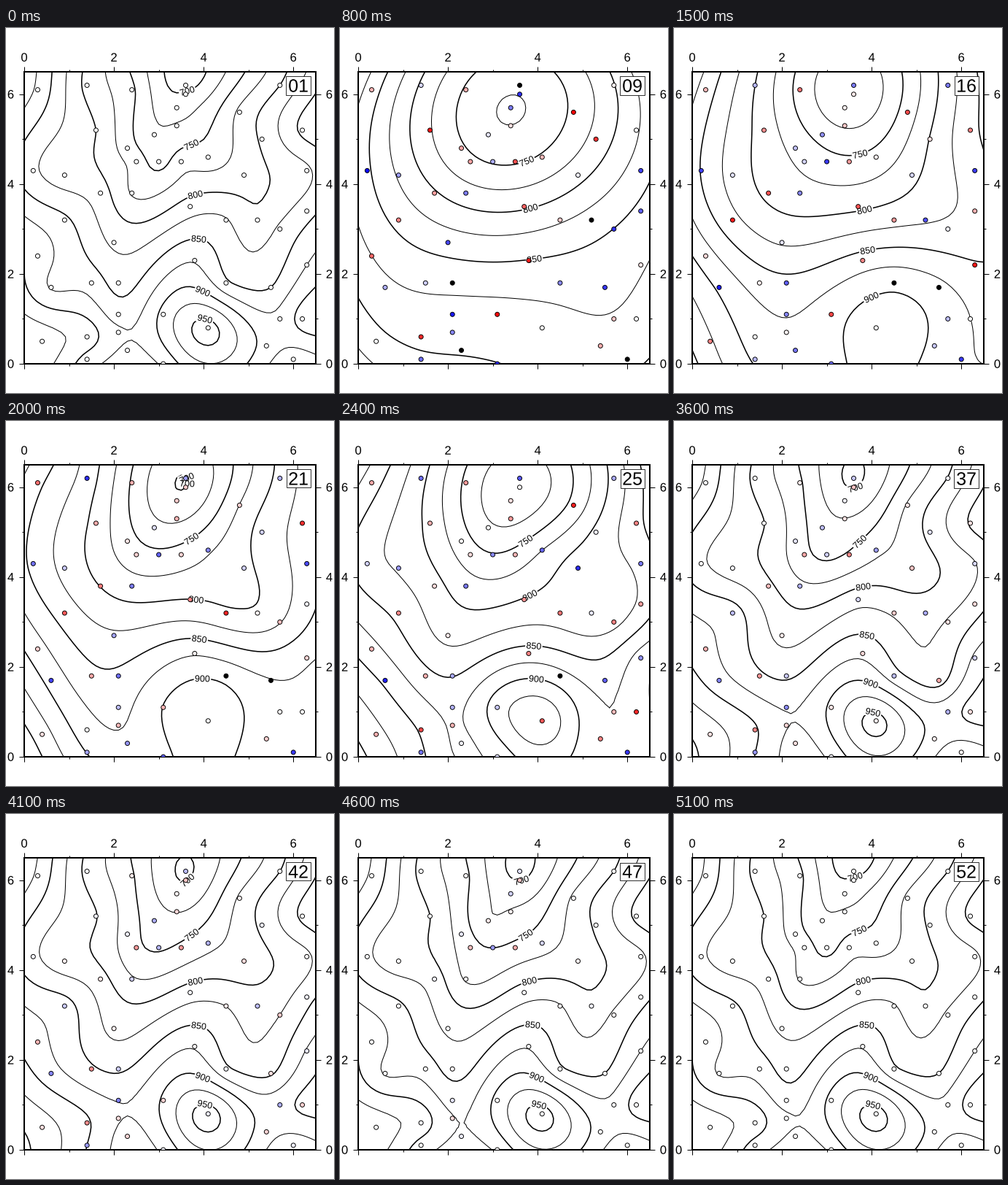
Recreate the animation shown at these times as a matplotlib script. Size 450 px wide and 500 px high, loop 5200 ms.

```python
import numpy as np
import matplotlib.pyplot as plt
from matplotlib.animation import FuncAnimation
from matplotlib.patches import PathPatch, Rectangle
from matplotlib.textpath import TextPath
from matplotlib.transforms import Affine2D

# Survey points: position and elevation
PX = np.array([
    0.3, 1.4, 2.4, 3.6, 5.7, 1.6, 2.9, 3.4, 3.4, 4.8, 5.3, 6.2, 0.2,
    0.9, 2.3, 2.5, 3.0, 3.5, 4.1, 4.9, 6.3, 0.9, 1.7, 2.4, 3.7, 4.5,
    5.2, 6.3, 0.3, 2.0, 3.8, 6.3, 0.6, 1.5, 2.1, 2.1, 3.1, 4.5, 5.5,
    5.7, 6.2, 0.4, 1.4, 1.4, 2.1, 2.3, 3.1, 4.1, 5.4, 6.0, 5.7, 3.6])
PY = np.array([
    6.1, 6.2, 6.1, 6.2, 6.2, 5.2, 5.1, 5.3, 5.7, 5.6, 5.0, 5.2, 4.3,
    4.2, 4.8, 4.5, 4.5, 4.5, 4.6, 4.2, 4.3, 3.2, 3.8, 3.8, 3.5, 3.2,
    3.2, 3.4, 2.4, 2.7, 2.3, 2.2, 1.7, 1.8, 1.8, 1.1, 1.1, 1.8, 1.7,
    1.0, 1.0, 0.5, 0.6, 0.1, 0.7, 0.3, 0.0, 0.8, 0.4, 0.1, 3.0, 6.0])
PZ = np.array([
    870, 793, 755, 690, 800, 800, 730, 728, 710, 780, 804, 855, 830,
    813, 762, 765, 740, 765, 760, 790, 820, 855, 812, 773, 812, 827,
    805, 840, 890, 820, 873, 875, 873, 865, 841, 862, 908, 855, 850,
    882, 910, 940, 915, 890, 880, 870, 880, 960, 890, 860, 830, 705.0])

W, H, DPI = 450, 500, 100
PT = 72 / DPI                       # points per pixel
LEFT, BOTTOM, SIDE, SPAN = 25, 40, 400, 6.5
UNIT = SIDE / SPAN
RIGHT, TOP = LEFT + SIDE, BOTTOM + SIDE
FONT = {"family": "Liberation Sans"}
N = len(PZ)
LEVELS = np.arange(600, 1026, 25)
MISFIT_MAX = 25


def to_px(x, y):
    return LEFT + UNIT * np.asarray(x), BOTTOM + UNIT * np.asarray(y)


# --- minimum curvature spline, truncated to its largest eigenvalues ---

def green(x, y):
    r = np.hypot(x[:, None] - PX, y[:, None] - PY)
    r = np.maximum(r, 1e-12)
    return r**2 * (np.log(r) - 1)


def plane(x, y):
    return np.column_stack([np.ones_like(x), x, y])


trend = np.linalg.lstsq(plane(PX, PY), PZ, rcond=None)[0]
eig, vec = np.linalg.eigh(green(PX, PY))
order = np.argsort(-np.abs(eig))
eig, vec = eig[order], vec[:, order]
coef = vec.T @ (PZ - plane(PX, PY) @ trend)


def make_fit(x, y):
    """Return a function giving the surface at x, y from k eigenvalues."""
    base = plane(x, y) @ trend
    modes = green(x, y) @ vec / eig * coef
    return lambda k: base + modes[:, :k].sum(axis=1)


axis = np.linspace(0, SPAN, 66)
gx, gy = np.meshgrid(axis, axis)
grid_fit = make_fit(gx.ravel(), gy.ravel())
point_fit = make_fit(PX, PY)
grid_px = to_px(gx, gy)
point_px = to_px(PX, PY)


def polar(misfit):
    """Blue-white-red; black below the range, white above it."""
    t = misfit / MISFIT_MAX
    rgb = np.column_stack([1 + np.minimum(t, 0), 1 - np.abs(t),
                           1 - np.maximum(t, 0)])
    rgb[t < -1] = 0
    rgb[t > 1] = 1
    return np.clip(rgb, 0, 1)


# --- stage ---

fig = plt.figure(figsize=(W / DPI, H / DPI), dpi=DPI, facecolor="white")
ax = fig.add_axes([0, 0, 1, 1])
ax.set_xlim(0, W)
ax.set_ylim(0, H)
ax.axis("off")

frame = Rectangle((LEFT, BOTTOM), SIDE, SIDE, fill=False, ec="black",
                  lw=2.08 * PT, joinstyle="miter", zorder=4)
ax.add_patch(frame)


def add_path(path, transform, zorder):
    patch = PathPatch(path, fc="black", lw=0, zorder=zorder)
    patch.set_transform(transform + ax.transData)
    return ax.add_patch(patch)


def add_box(ext, pad, transform, zorder, lw=0):
    box = Rectangle((ext.x0 - pad, ext.y0 - pad), ext.width + 2 * pad,
                    ext.height + 2 * pad, fc="white",
                    ec="black" if lw else "none", lw=lw, zorder=zorder)
    box.set_transform(transform + ax.transData)
    return ax.add_patch(box)


def text_path(s, size):
    path = TextPath((0, 0), s, size=size, prop=FONT)
    return path, path.get_extents()


def centred(ext, x, y, angle=0):
    return (Affine2D()
            .translate(-(ext.x0 + ext.x1) / 2, -(ext.y0 + ext.y1) / 2)
            .rotate_deg(angle).translate(x, y))


def draw_axes():
    def tick(x, y):
        ax.plot(x, y, color="black", lw=PT, solid_capstyle="butt", zorder=4)

    for v in range(7):
        size = 6.94 if v % 2 == 0 else 3.47
        x, y = to_px(v, v)
        tick([x, x], [TOP, TOP + size])
        tick([x, x], [BOTTOM, BOTTOM - size])
        tick([LEFT, LEFT - size], [y, y])
        tick([RIGHT, RIGHT + size], [y, y])
        if v % 2 == 0:
            path, ext = text_path(str(v), 16.67)
            for cx, cy in [(x, 459.9), (6.5, y), (443.5, y)]:
                add_path(path, centred(ext, cx, cy), 4)


draw_axes()

# --- contour labels, placed where contours cross a fixed line ---

P0 = np.array(to_px(3.6, 6.5))
P1 = np.array(to_px(4.05, 0.75))


def crossings(seg):
    """Yield the point and text angle of each crossing."""
    d = P1 - P0
    rel = seg - P0
    side = d[0] * rel[:, 1] - d[1] * rel[:, 0]
    closed = np.allclose(seg[0], seg[-1])
    for i in np.flatnonzero((side[:-1] < 0) != (side[1:] < 0)):
        f = side[i] / (side[i] - side[i + 1])
        p = seg[i] + f * (seg[i + 1] - seg[i])
        if not 0 <= (p - P0) @ d / (d @ d) <= 1:
            continue
        near = np.arange(i - 5, i + 6)
        if closed:
            near %= len(seg) - 1
        else:
            near = near[(near >= 0) & (near < len(seg))]
        dx, dy = (seg[near] - p).T
        yield p, np.degrees(np.arctan2(dx @ dy, dx @ dx))


def draw_labels(contours):
    items = []
    for level, segs in zip(LEVELS, contours.allsegs):
        if level % 50:
            continue
        path, ext = text_path(str(level), 12.5)
        for seg in segs:
            if len(seg) < 2:
                continue
            for p, angle in crossings(seg):
                place = centred(ext, *p, angle)
                items += [add_box(ext, 1.9, place, 2),
                          add_path(path, place, 3)]
    for item in items:
        item.set_clip_path(frame)
    return items


def draw_tag(number):
    path, ext = text_path(f"{number:02d}", 25)
    place = Affine2D().translate(RIGHT - 10 - 1.112 * 25, 412.4)
    return [add_box(ext, 3.75, place, 6, lw=0.8 * PT),
            add_path(path, place, 7)]


shown = []


def clear():
    while shown:
        shown.pop().remove()
    return []


def draw(i):
    clear()
    number = i + 1
    # A count of one means the whole set of eigenvalues
    k = N if number == 1 else number
    surface = grid_fit(k).reshape(gx.shape)
    contours = ax.contour(
        *grid_px, surface, levels=LEVELS, colors="black", zorder=1,
        linewidths=[(1.0 if v % 50 else 1.55) * PT for v in LEVELS])
    dots = ax.scatter(*point_px, s=(6 * PT)**2, c=polar(PZ - point_fit(k)),
                      edgecolors="black", linewidths=0.95 * PT, zorder=5)
    dots.set_clip_path(frame)
    shown.extend([contours, dots, *draw_labels(contours), *draw_tag(number)])
    return shown


anim = FuncAnimation(fig, draw, frames=N, interval=100, init_func=clear,
                     repeat=True, blit=False)
plt.show()
```
